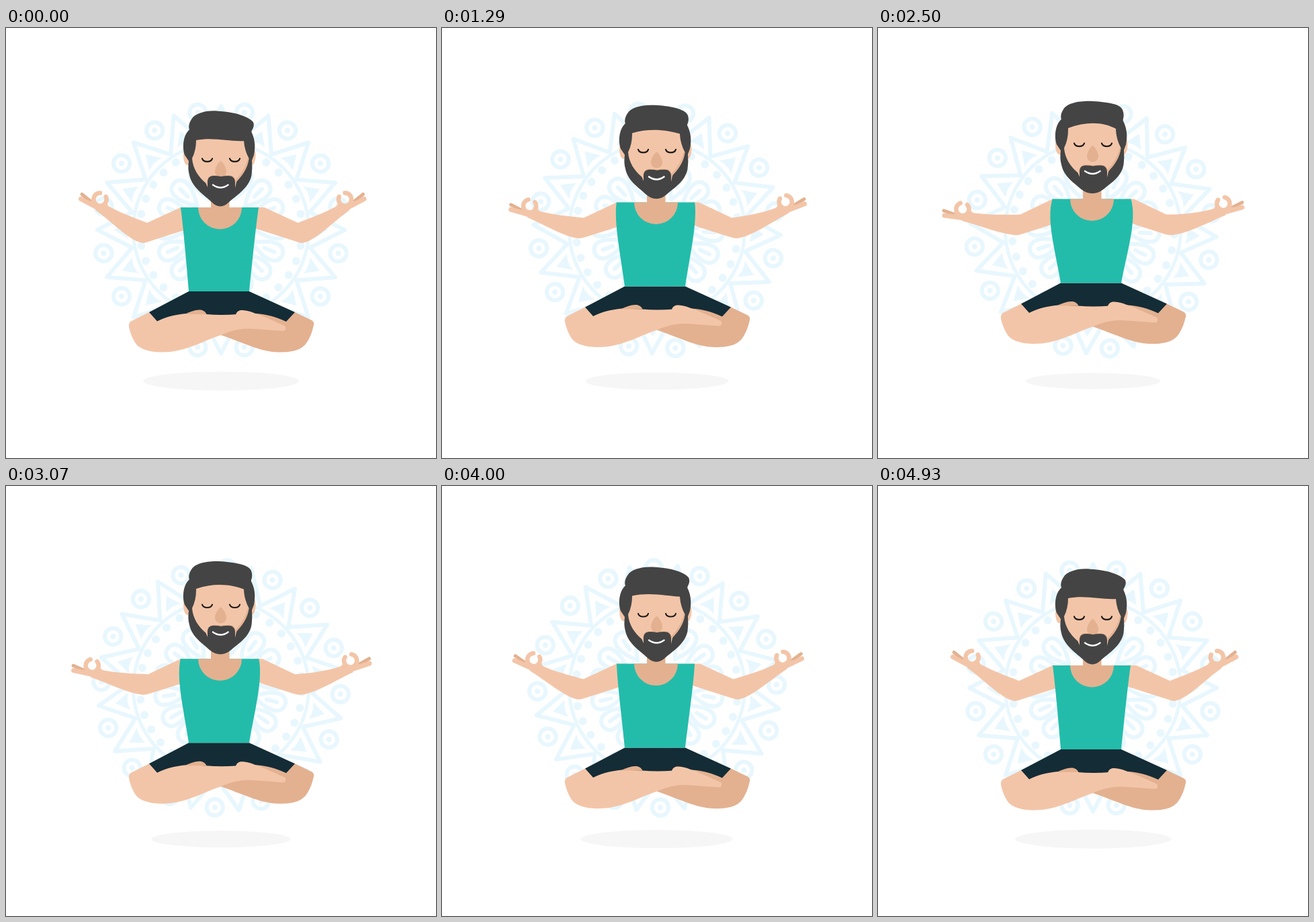
Animation of 640x640 px, one loop 5000 ms. Source, as an HTML page with a canvas:

```html
<!DOCTYPE html>
<html lang="en">
<head>
<meta charset="utf-8">
<title>Levitating meditation</title>
<style>
html, body { margin: 0; width: 100%; height: 100%; overflow: hidden; background: #fff; }
canvas { display: block; }
</style>
</head>
<body>
<canvas id="stage" width="640" height="640"></canvas>
<script>
const ctx = document.getElementById('stage').getContext('2d');
const LOOP = 5000, MOVE = 4667, TAU = Math.PI * 2, STEP = TAU / 16;
const SKIN = '#f3c5a8', TAN = '#e3b190', HAIR = '#444444', TEAL = '#23bcaa',
      NAVY = '#142c36', PALE = '#e8f7fe', INK = '#1d1a19';

const lerp = (a, b, u) => a + (b - a) * u;

function fill(color, path) {
  ctx.fillStyle = color;
  ctx.fill(new Path2D(path));
}

function line(color, width, path) {
  ctx.strokeStyle = color;
  ctx.lineWidth = width;
  ctx.stroke(new Path2D(path));
}

function oval(color, x, y, rx, ry = rx) {
  ctx.fillStyle = color;
  ctx.beginPath();
  ctx.ellipse(x, y, rx, ry, 0, 0, TAU);
  ctx.fill();
}

function hoop(x, y, r, width, from = 0, to = TAU) {
  ctx.lineWidth = width;
  ctx.beginPath();
  ctx.arc(x, y, r, from, to);
  ctx.stroke();
}

function moved(dx, dy, draw) {
  ctx.save();
  ctx.translate(dx, dy);
  draw();
  ctx.restore();
}

function repeat(count, offset, draw) {
  for (let i = 0; i < count; i++) {
    ctx.save();
    ctx.rotate(i * TAU / count + offset);
    draw();
    ctx.restore();
  }
}

function mandala(angle) {
  ctx.save();
  ctx.translate(320, 300.5);
  ctx.rotate(angle);
  ctx.strokeStyle = PALE;
  hoop(0, 0, 130.7, 5);
  repeat(16, STEP / 2, () => {
    hoop(0, -178, 12.2, 6);
    oval(PALE, 0, -178, 4);
  });
  repeat(16, 0, () => {
    line(PALE, 6, 'M-26 -133 L0 -184 L26 -133');
    fill(PALE, 'M0 -159 L13 -138 Q0 -143 -13 -138Z');
    line(PALE, 6, 'M0 -50 C-7 -62 -14 -74 -13 -86 C-12 -103 12 -103 13 -86 C14 -74 7 -62 0 -50Z');
    line(PALE, 6, 'M0 -70 V-86');
  });
  repeat(32, 0, () => oval(PALE, 0, -121, 6));
  ctx.restore();
}

// hand: position and turn of the finger ring at the top of the rise
function arm(u, lift, hand) {
  const bulge = 4.8 * u * (1 - u);
  const hx = lerp(140, hand.x, u) - bulge, hy = lerp(255, hand.y, u) + bulge * hand.sag;
  const turn = hand.turn * u, c = Math.cos(turn), s = Math.sin(turn);
  const onHand = (x, y) => `${hx + x * c - y * s} ${hy + x * s + y * c}`;
  const at = (x0, y0, x1, y1) => `${lerp(x0, x1, u)} ${lerp(y0, y1, u)}`;

  fill(SKIN, `M275 ${267 - lift} L260 ${267 - lift} L${at(210, 290, 212, 277.3)}
    C${at(190, 282, 190, 278)} ${onHand(30, 20)} ${onHand(12, 10)}
    L${onHand(-7, 16)}
    C${onHand(15, 31)} ${at(184, 317, 180, 306)} ${at(203, 320, 203, 308)}
    Q${at(206, 320, 208, 308.5)} ${at(212, 318, 214, 306.5)}
    L${at(262, 302, 257, 293)} L275 ${298 - lift}Z`);

  ctx.save();
  ctx.translate(hx, hy);
  ctx.rotate(turn);
  line(TAN, 5, 'M-27 -7.5 L-14 3');
  line(SKIN, 7, 'M-28.5 -.5 L-4 12.5');
  fill(SKIN, 'M-18 2 L-12 3 L-5 8 L4 9 L11 7 L13 11 L-6 16Z');
  ctx.strokeStyle = SKIN;
  hoop(0, 0, 9.6, 6.5, -0.42, TAU * 0.75);
  ctx.restore();
}

function arms(u, lift) {
  arm(u, lift, { x: 125.8, y: 269.8, turn: -0.354, sag: 1 });
  ctx.save();
  ctx.translate(lerp(644.5, 640.8, u), 0);
  ctx.scale(-1, 1);
  arm(u, lift, { x: 126.8, y: 261.5, turn: -0.21, sag: 0 });
  ctx.restore();
}

function legs() {
  fill(TAN, `M430 423 L455 435 Q460 438 457.5 444 Q455 456 449 466
    C441 480 425 483 405 482.5 C378 482 350 467 320 457 L340 415 L417 425Z`);
  fill(SKIN, `M213 423 L186 436.5 Q182 439 183 445 C185 455 189 463 192 468
    C199 480 220 484 244 482 C273 479 300 463 320 457 C340 448 355 446.5 372 448
    L413 451 Q417 450 416 444.5 C400 437 385 430 372 425 L360 415 L240 418Z`);
  fill(NAVY, `M272 392 H362 L430 423 L417 437 C400 429 387 426 372 425 L345 426
    Q320 428 298 426 L268 425 C250 427 238 430 225 436.5 L213 423Z`);
  fill(TAN, 'M266 426 C279 420 293 415 298.5 426Z');
  fill(SKIN, 'M342 426.5 C345 417 355 420 365 422.5 C382 429 400 437 416 444 L372 442Z');
}

function torso(u) {
  const top = 267, x = (a, b) => lerp(a, b, u);
  fill(TEAL, `M${x(260, 259.5)} ${top} C${x(264, 250)} ${top + 32} ${x(268, 264)} ${top + 77} 272 392
    H362 C${x(367, 371)} ${top + 77} ${x(371.5, 386)} ${top + 32} ${x(376, 376.5)} ${top}Z`);
  fill(TAN, 'M305 235 H332.5 V267 H351 A32.5 32.5 0 0 1 286 267 H305Z');
}

function head(u) {
  const side = -15.8 * u, chin = -3.7 * u, round = 4 * u;
  moved(0, side, () => {
    oval(SKIN, 270, 190, 6, 14);
    oval(SKIN, 365.5, 190, 6, 14);
    fill(HAIR, `M276 149 C263 157 262 178 266 189 L272 198 C271 206 271 212 273 219
      C277 238 ${297 - round} ${250 + chin} ${306 - round} ${259 + chin}
      Q319 ${272 + chin} ${332 + round} ${259 + chin}
      C${342 + round} ${250 + chin} 362 238 365.5 219 Q367 208 366 197 L369 189
      C372 175 370 163 364 152Z`);
    fill(SKIN, `M283 155 H355 L354 168 Q355 182 361.5 194 C360 210 350 221 343 229
      L341 238 L320 228 L300 237 L297.5 231 C287 222 278 210 277 194 Q283 182 283 167Z`);
    line(TAN, 2, 'M360.5 195 C358 209 350 219 342.5 227');
  });
  moved(0, -23 * u, () => {
    line(INK, 2.2, 'M292 194.3 C294 200.3 305 200.3 307 194.3 M333 194.3 C335 200.3 346 200.3 348 194.3');
    fill(TAN, 'M319.5 198 C322 198 328 208 328 213 C328 225 311 225 311 213 C311 208 317 198 319.5 198Z');
  });
  moved(0, side, () => {
    const lip = `M300 230 C300 222 304 220 310 220 Q316 220 320 221
      Q324 220 331 220 C337 220 341 223 341 230`;
    line(TAN, 2, lip);
    fill(HAIR, lip + ' V238 L336 246 H304 L300 238Z');
  });
  moved(0, -20.8 * u, () => line('#fff', 2.5, 'M308 233.5 Q319.5 241.5 330.5 233.5'));
  moved(0, -15.2 * u, () => {
    const y = (a, b) => lerp(a, b, u);
    fill(HAIR, `M276 157 C270 149 272 142 276 136 C281 127 298 ${y(122, 123.5)} 316 123.7
      C${y(342, 338)} 125 361 ${y(132, 127)} ${y(368, 364)} ${y(140, 137)}
      C${y(371, 368)} 148 ${y(365, 363)} 151 364.5 158 L356 ${y(168, 166)}
      C335 ${y(170, 154)} 310 ${y(162, 154)} 283 ${y(167, 164)}Z`);
  });
}

function draw(ms) {
  const progress = Math.min((ms % LOOP) / MOVE, 1);
  const u = (1 - Math.cos(TAU * progress)) / 2;
  const lift = 12.7 * u;
  ctx.fillStyle = '#fff';
  ctx.fillRect(0, 0, 640, 640);
  ctx.lineCap = ctx.lineJoin = 'round';
  mandala(progress * TAU / 4);
  oval('#f6f6f6', 320, 525.5, lerp(116, 100, u), lerp(14, 12, u));
  arms(u, lift);
  moved(0, -lift, () => {
    legs();
    torso(u);
  });
  head(u);
}

const start = performance.now();
function tick() {
  draw(performance.now() - start);
  requestAnimationFrame(tick);
}
tick();
</script>
</body>
</html>
```
